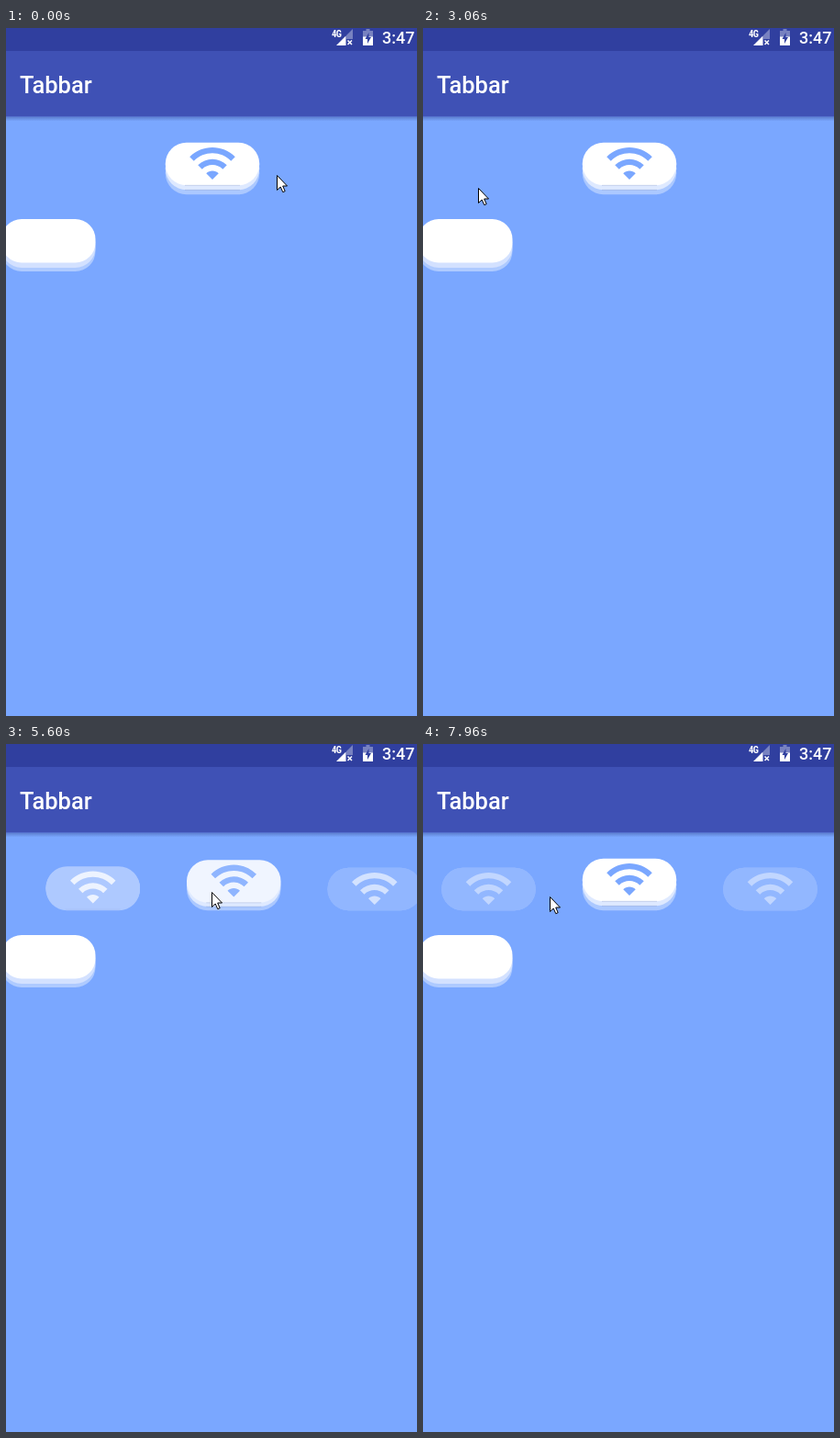
These frames come from a looping animation (448x749 px, 8 s). An HTML page:

```html
<!DOCTYPE html>
<html lang="en">
<head>
<meta charset="utf-8">
<title>Tabbar</title>
<style>
  html, body { margin: 0; width: 100%; height: 100%; overflow: hidden; background: #7aa7ff; }
  svg { display: block; width: 448px; height: 749px; }
  text { font-family: Roboto, sans-serif; font-weight: 500; fill: #fff; }
</style>
</head>
<body>
<svg viewBox="0 0 448 749">
  <defs>
    <linearGradient id="shade" x2="0" y2="1">
      <stop stop-color="#34488c" stop-opacity=".45"/>
      <stop offset="1" stop-color="#34488c" stop-opacity="0"/>
    </linearGradient>
    <path id="wifi" d="M1 9l2 2c4.97-4.97 13.03-4.97 18 0l2-2C16.93 2.93 7.08 2.93 1 9zm8 8l3 3 3-3c-1.65-1.66-4.34-1.66-6 0zm-4-4l2 2c2.76-2.76 7.24-2.76 10 0l2-2C15.14 9.14 8.87 9.14 5 13z"/>
  </defs>

  <rect width="448" height="749" fill="#7aa7ff"/>
  <rect y="96.500" width="448" height="5" fill="url(#shade)"/>
  <rect y="25" width="448" height="71.500" fill="#3f51b5"/>
  <rect width="448" height="25" fill="#303f9f"/>
  <text x="15" y="71" font-size="25.5">Tabbar</text>
  <text x="410" y="17" font-size="18">3:47</text>
  <text x="355" y="9.500" font-size="10.500" style="font-family:'Roboto Condensed',Roboto,sans-serif;font-weight:700" letter-spacing="-.6">4G</text>

  <path d="M378 1V12H371V8z" fill="#fff" opacity=".35"/>
  <path d="M360 19L370.500 8.500V19z" fill="#fff"/>
  <path d="M372.500 13.500l4.500 4.500m0-4.500l-4.500 4.500" stroke="#fff" stroke-width="1.500"/>
  <path d="M389 3h3.500V1h4v2H400v7H389z" fill="#fff" opacity=".35"/>
  <path d="M389 9.500h11V19H389z" fill="#fff"/>
  <path d="M395.500 5l-4 7h2.500v5l4-7h-2.500z" fill="#303f9f"/>

  <rect x="-5" y="218" width="102.500" height="47" rx="22" fill="#aecaff"/>
  <rect x="-5" y="213.500" width="102.500" height="47.500" rx="22" fill="#d3e1ff"/>
  <rect x="-5" y="208" width="102.500" height="47.500" rx="22" fill="#fff"/>

  <g id="tabs"></g>
  <path id="cursor" d="M.5 .5V16.500L4.200 13 6.800 18.700 9.200 17.600 6.700 12H11.500z" fill="#fff" stroke="#000"/>
</svg>
<script>
const LOOP = 8000, STEP = 138.6, FADE = 1000;
const GAP = 153.5, MID = 225, W = 102.5, H = 46.5;
const BACK = [122, 167, 255];

const FIRST_PAGE = 2;
const swipes = [
  { start: 930, end: 1650, turn: 1 },
  { start: 3550, end: 4270, turn: -1 },
  { start: 4270, end: 4720, turn: -1 },
  { start: 4730, end: 5897, turn: 1 },
  { start: 5920, end: 6620, turn: 1 },
  { start: 6900, end: 7600, turn: -1 }
];

// The pointer's turning points: time, x, y
const path = [
  [0, 295, 160], [930, 425, 165], [1450, 190, 160], [2072, 347, 160], [3400, 2, 177],
  [3896, 161, 161], [4270, 40, 165], [4730, 415, 158], [4917, 384, 158], [5610, 224, 161],
  [5920, 415, 163], [6870, 54, 173], [7350, 230, 168], [7800, 138, 166]
];

// Refreshes come in bursts of eight
const bursts = [150, 1240, 2360, 3480, 4640, 5750, 6870, 7960];

const clamp = v => Math.max(0, Math.min(1, v));
const ease = u => u * u * (3 - 2 * u);
const mix = a => `rgb(${BACK.map(c => Math.round(c + (255 - c) * a))})`;

function snap(t) {
  const start = bursts.findLast(s => s <= t);
  return start ? start + STEP * Math.min(7, Math.floor((t - start) / STEP + .2)) : 0;
}

function pageAt(t) {
  return swipes.reduce((p, s) => p + s.turn * ease(clamp((t - s.start) / (s.end - s.start))), FIRST_PAGE);
}

// Neighbours of the chosen tab fade out once the pager rests
function idleGlow(t) {
  const last = swipes.findLast(s => s.start <= t);
  return last ? clamp(1 - (t - last.end) / FADE) : 0;
}

function pointerAt(t) {
  const i = path.findLastIndex(k => k[0] <= t);
  const [t0, x0, y0] = path[i], [t1, x1, y1] = path[i + 1] || [LOOP, x0, y0];
  const u = ease((t - t0) / (t1 - t0));
  return [x0 + (x1 - x0) * u, y0 + (y1 - y0) * u].map(Math.round);
}

function set(el, attrs) {
  for (const key in attrs) el.setAttribute(key, attrs[key]);
}

function add(parent, name, attrs = {}) {
  const el = document.createElementNS("http://www.w3.org/2000/svg", name);
  set(el, attrs);
  return parent.appendChild(el);
}

const tabs = [0, 1, 2, 3].map(() => {
  const g = add(document.getElementById("tabs"), "g");
  const pill = () => add(g, "rect", { x: -W / 2, width: W, height: H, rx: 23 });
  const line = () => add(g, "path", { stroke: "#6f86bd" });
  const base = pill(), mid = pill(), midLine = line(), top = pill(), topLine = line();
  return { g, base, mid, midLine, top, topLine, icon: add(g, "use", { href: "#wifi" }) };
});
const cursor = document.getElementById("cursor");

function drawTab(tab, offset, idle) {
  const d = Math.abs(offset), near = Math.max(0, 1 - d);
  const fade = near + (1 - near) * idle;
  const alpha = Math.max(0, 1 - .72 * d);
  const ink = Math.max(0, Math.min(d * 1.02, 1.55 - .72 * d, (1.4 - d) * 2.7));
  const low = 134.8, midY = low - 5 * near, topY = low - 10 * near;
  const layer = (el, y, limit) => set(el, { y, fill: mix(Math.min(limit, alpha) * fade) });
  const edge = (el, y) => set(el, { d: `M-30 ${y + H}H30`, opacity: .3 * near });

  set(tab.g, {
    transform: `translate(${MID + offset * GAP})`,
    visibility: alpha * fade < .01 ? "hidden" : "visible"
  });
  layer(tab.base, low, .37);
  layer(tab.mid, midY, .75);
  layer(tab.top, topY, 1);
  edge(tab.midLine, midY);
  edge(tab.topLine, topY);
  set(tab.icon, {
    fill: mix(ink * fade),
    transform: `translate(-27 ${topY - 4.8}) scale(2.25)`
  });
}

function frame(now) {
  const t = snap(now % LOOP), p = pageAt(t), idle = idleGlow(t);
  tabs.forEach((tab, i) => drawTab(tab, i - p, idle));
  set(cursor, { transform: `translate(${pointerAt(t)})` });
  requestAnimationFrame(frame);
}
frame(0);
</script>
</body>
</html>
```
